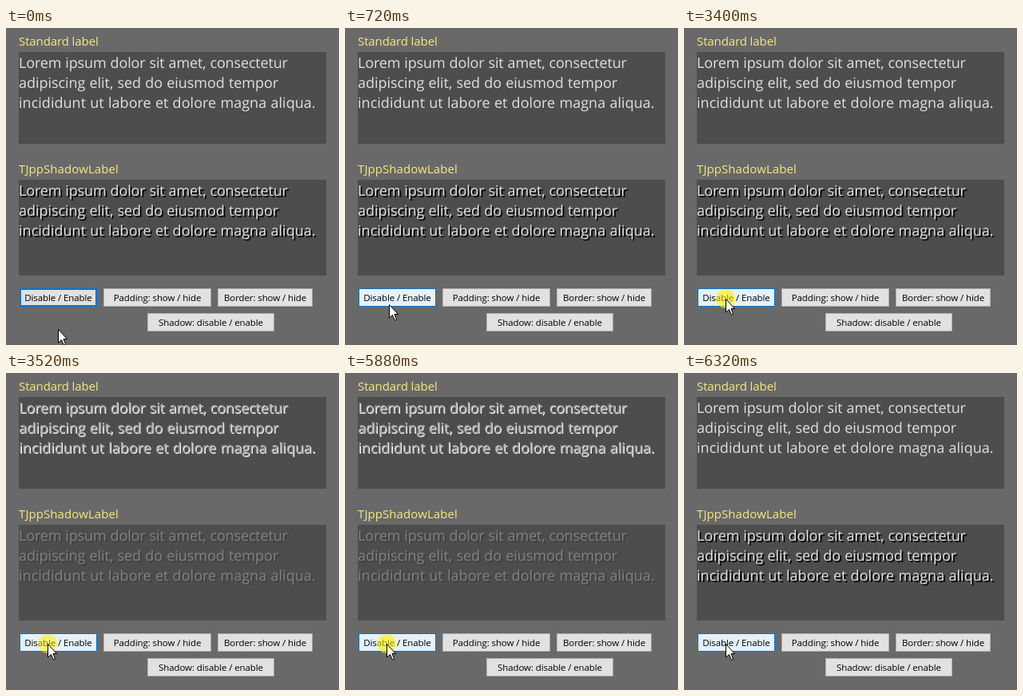
Write an HTML page that moves like this. It is 417x397 px and loops after 8 s.

```html
<!DOCTYPE html>
<html lang="en">
<head>
<meta charset="utf-8">
<title>Label demo</title>
<style>
  html, body { margin: 0; width: 100%; height: 100%; overflow: hidden; background: #696969; }
  svg { display: block; width: 417px; height: 397px; }
  text { font-family: "Open Sans", "Noto Sans", sans-serif; white-space: pre; }
  .title { font-size: 15px; fill: #f8e87f; }
  .body { font-size: 18px; word-spacing: 0.5px; text-rendering: geometricPrecision; }
  .caption { font-size: 11.5px; letter-spacing: -0.1px; text-anchor: middle; fill: #000; }
  .panel { fill: #4d4d4d; }
</style>
</head>
<body>
<svg id="stage" viewBox="0 0 417 397"></svg>
<script>
const LOOP = 8000;
const STEP = 40;
const TOGGLES = [3520, 6000];
const CLICKS = [3400, 5880];

// time, x, y of the pointer tip
const PATH = [
  [0, 65, 377], [120, 65, 377], [480, 60, 358],
  [720, 55, 346], [960, 52, 340], [1040, 52, 339]
];

// text, letter spacing
const LINES = [
  ["Lorem ipsum dolor sit amet, consectetur", -0.15],
  ["adipiscing elit, sed do eiusmod tempor", -0.04],
  ["incididunt ut labore et dolore magna aliqua.", 0.03]
];

// text, x, y, width
const BUTTONS = [
  ["Disable / Enable", 17, 326, 97],
  ["Padding: show / hide", 122, 326, 135],
  ["Border: show / hide", 265, 326, 119],
  ["Shadow: disable / enable", 177, 357, 159]
];

const stage = document.getElementById("stage");

function add(parent, tag, attrs, content) {
  const el = document.createElementNS("http://www.w3.org/2000/svg", tag);
  for (const key in attrs) el.setAttribute(key, attrs[key]);
  if (content) el.textContent = content;
  parent.appendChild(el);
  return el;
}

function addText(parent, cls, x, y, content, spacing = 0) {
  return add(parent, "text", { class: cls, x, y, "letter-spacing": spacing }, content);
}

function paragraph(top, fill, offset = 0) {
  const g = add(stage, "g", { fill, transform: `translate(${offset} ${offset})` });
  LINES.forEach(([line, spacing], i) => addText(g, "body", 16, top + 20 + i * 25, line, spacing));
  return g;
}

function panel(title, spacing, top, height) {
  addText(stage, "title", 16, top - 8, title, spacing);
  add(stage, "rect", { class: "panel", x: 16, y: top, width: 385, height });
}

function button([label, x, y, width]) {
  const face = add(stage, "rect", {
    x: x + 0.5, y: y + 0.5, width: width - 1, height: 22, fill: "#e1e1e1", stroke: "#adadad"
  });
  const ring = add(stage, "rect", {
    x: x + 1.5, y: y + 1.5, width: width - 3, height: 20, fill: "none", stroke: "none"
  });
  addText(stage, "caption", x + width / 2, y + 16, label);
  return { face, ring };
}

panel("Standard label", -0.1, 30, 115);
const emboss = paragraph(30, "#fff", 1);
const plain = paragraph(30, "#e0e0e0");
panel("TJppShadowLabel", 0.08, 190, 120);
const shadow = paragraph(190, "#000", 2);
const raised = paragraph(190, "#e0e0e0");

const [main] = BUTTONS.map(button);
main.face.setAttribute("stroke", "#0078d7");

const glow = add(stage, "circle", { cx: 52, cy: 339, r: 12, fill: "#fff200" });
const pointer = add(stage, "path", {
  d: "M.5 .5V17L4.5 13.5L7.5 20.3L9.6 19.3L7 12.5H11.5Z",
  fill: "#fff", stroke: "#000", "stroke-width": 1
});

function tipAt(t) {
  const i = PATH.findIndex(p => p[0] > t);
  if (i < 0) return PATH[PATH.length - 1].slice(1);
  const [t0, x0, y0] = PATH[i - 1];
  const [t1, x1, y1] = PATH[i];
  const k = (t - t0) / (t1 - t0);
  return [Math.round(x0 + (x1 - x0) * k), Math.round(y0 + (y1 - y0) * k)];
}

// full strength at the click, then gone by 400 ms
function glowAt(t) {
  const age = t - CLICKS[t < CLICKS[1] ? 0 : 1];
  if (age < 0 || age >= 400) return 0;
  return 0.6 * Math.min(1, (400 - age) / 320);
}

function draw(t) {
  const [x, y] = tipAt(t);
  pointer.setAttribute("transform", `translate(${x} ${y})`);

  const hover = y < 349;
  main.face.setAttribute("fill", hover ? "#e5f1fb" : "#e1e1e1");
  main.ring.setAttribute("stroke", hover ? "none" : "#0078d7");

  const disabled = t >= TOGGLES[0] && t < TOGGLES[1];
  emboss.setAttribute("visibility", disabled ? "visible" : "hidden");
  plain.setAttribute("fill", disabled ? "#a0a0a0" : "#e0e0e0");
  shadow.setAttribute("fill", disabled ? "#404040" : "#000");
  raised.setAttribute("fill", disabled ? "#808080" : "#e0e0e0");

  glow.setAttribute("opacity", glowAt(t));
}

const start = performance.now();
function tick() {
  const t = (performance.now() - start) % LOOP;
  draw(Math.floor(t / STEP) * STEP);
  requestAnimationFrame(tick);
}
tick();
</script>
</body>
</html>
```
